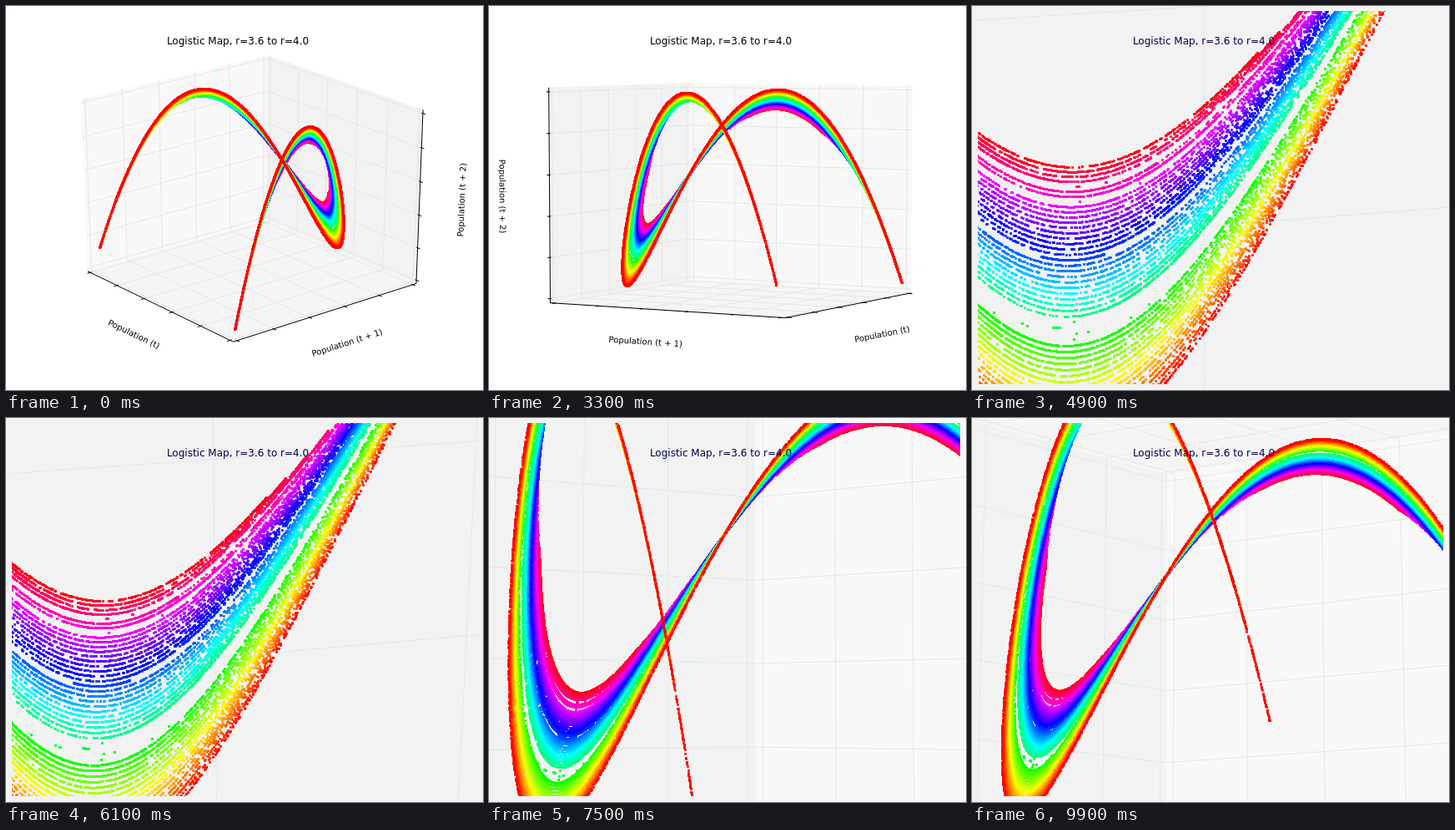
Write an HTML page with a canvas that moves like this. It is 572 by 460 pixels and loops after 10000 ms.

```html
<!DOCTYPE html>
<html lang="en">
<head>
<meta charset="utf-8">
<title>Logistic Map</title>
<style>
  html, body { margin: 0; width: 100%; height: 100%; overflow: hidden; background: #fff; }
  canvas { display: block; }
</style>
</head>
<body>
<canvas id="stage" width="572" height="460"></canvas>
<script>
const ctx = document.getElementById('stage').getContext('2d');
const W = 572, H = 460;
const STEP_MS = 100, STEPS = 100;
const PLOT = { x: 7.2, y: 6.4, w: 558, h: 446.4 };
const VIEW = { min: -0.095, span: 0.185 };
const LOW = -1 / 48, HIGH = 1 + 1 / 48;
const TICKS = [0, 0.2, 0.4, 0.6, 0.8, 1];
const LABEL_GAP = 0.135;
const DOT = 2.7;

const AXES = [
  { i: 0, tickDir: 1, flip: 1, label: 'Population (t)',     pane: '#f8f8f8', baseline: 2.7 },
  { i: 1, tickDir: 0, flip: 0, label: 'Population (t + 1)', pane: '#f2f2f2', baseline: 2.7 },
  { i: 2, tickDir: 0, flip: 0, label: 'Population (t + 2)', pane: '#f5f5f5', baseline: 1.2 }
];

// Change per step while the step number lies in [from, to].
const MOVES = [
  { from: 0,  to: 18, azim: -0.2, elev: 0,   dist: 0 },
  { from: 19, to: 29, azim: -10,  elev: -2,  dist: -0.05 },
  { from: 33, to: 49, azim: 3,    elev: 1.4, dist: -0.55 },
  { from: 61, to: 79, azim: -2,   elev: -2,  dist: 0.2 },
  { from: 80, to: 99, azim: -0.2, elev: 0,   dist: 0 }
];

function simulate(rate, discard = 20, count = 2000) {
  const pops = [];
  let pop = 0.5;
  for (let g = 0; g < discard + count; g++) {
    if (g >= discard) pops.push(pop);
    pop = pop * rate * (1 - pop);
  }
  return pops;
}

const RATES = 50;
const rateStep = (3.6 + (4 - 3.6) / RATES) - 3.6;
const orbits = Array.from({ length: RATES }, (_, i) => ({
  color: `hsl(${354.4 * (1 - i / (RATES - 1))}, 100%, 50%)`,
  pops: simulate(3.6 + i * rateStep)
}));

function cameraAt(step) {
  const cam = { azim: 321, elev: 25, dist: 11 };
  for (const m of MOVES) {
    const n = Math.max(0, Math.min(step, m.to) - m.from + 1);
    for (const key in cam) cam[key] += n * m[key];
  }
  return cam;
}

function makeView({ azim, elev, dist }) {
  const a = azim * Math.PI / 180, e = elev * Math.PI / 180;
  const ca = Math.cos(a), sa = Math.sin(a), ce = Math.cos(e), se = Math.sin(e);
  const project = (px, py, pz) => {
    const x = px - 0.5, y = py - 0.5, z = pz - 0.5;
    const depth = dist - (ca * ce * x + sa * ce * y + se * z);
    const u = (ca * y - sa * x) / depth;
    const v = (ce * z - se * (ca * x + sa * y)) / depth;
    return [
      PLOT.x + (u - VIEW.min) / VIEW.span * PLOT.w,
      PLOT.y + PLOT.h - (v - VIEW.min) / VIEW.span * PLOT.h
    ];
  };
  // Planes of the box that face away from the viewer.
  const far = [ca * ce, sa * ce, se].map(c => (c > 0 ? LOW : HIGH));
  return { project, far };
}

const replaced = (point, i, value) => point.map((c, k) => (k === i ? value : c));
const opposite = c => (c === LOW ? HIGH : LOW);

function trace(project, points) {
  ctx.beginPath();
  for (const p of points) ctx.lineTo(...project(...p));
}

function drawPane({ project, far }, { i, pane }) {
  const [j, k] = [0, 1, 2].filter(n => n !== i);
  const corner = (a, b) => replaced(replaced(far, j, a), k, b);
  trace(project, [corner(LOW, LOW), corner(HIGH, LOW), corner(HIGH, HIGH), corner(LOW, HIGH)]);
  ctx.fillStyle = pane;
  ctx.fill();
}

function drawGrid({ project, far }, { i }) {
  const [j, k] = [0, 1, 2].filter(n => n !== i);
  ctx.strokeStyle = '#e6e6e6';
  for (const t of TICKS) {
    const mid = replaced(far, i, t);
    trace(project, [replaced(mid, j, opposite(far[j])), mid, replaced(mid, k, opposite(far[k]))]);
    ctx.stroke();
  }
}

function drawAxis({ project, far }, { i, tickDir, flip, label, baseline }) {
  const start = replaced(far, flip, opposite(far[flip]));
  const end = replaced(start, i, opposite(start[i]));
  ctx.strokeStyle = '#000';
  trace(project, [start, end]);
  ctx.stroke();

  const sign = far[tickDir] === HIGH ? 1 : -1;
  for (const t of TICKS) {
    const at = offset => replaced(replaced(start, i, t), tickDir, start[tickDir] + sign * offset / 12);
    trace(project, [at(0.1), at(-0.2)]);
    ctx.stroke();
  }

  const anchor = start.map((c, k) => (k === i ? 0.5 : c + Math.sign(c - 0.5) * LABEL_GAP));
  const [x1, y1] = project(...start), [x2, y2] = project(...end);
  let angle = (Math.atan2(y1 - y2, x2 - x1) + Math.PI) % Math.PI;
  if (angle > Math.PI / 2) angle -= Math.PI;
  ctx.save();
  ctx.translate(...project(...anchor));
  ctx.rotate(-angle);
  ctx.font = '10px "DejaVu Sans", sans-serif';
  ctx.fillStyle = '#000';
  ctx.fillText(label, 0, baseline);
  ctx.restore();
}

// Dots sit on whole pixels, which keeps the bands crisp.
function drawOrbits({ project }) {
  const inset = (1 - DOT) / 2;
  ctx.save();
  ctx.beginPath();
  ctx.rect(7, 6, 558, 447);
  ctx.clip();
  for (const { color, pops } of orbits) {
    ctx.fillStyle = color;
    for (let t = 0; t + 2 < pops.length; t++) {
      const [x, y] = project(pops[t], pops[t + 1], pops[t + 2]);
      if (x < 0 || x > W || y < 0 || y > H) continue;
      ctx.fillRect(Math.floor(x) + inset, Math.floor(y) + inset, DOT, DOT);
    }
  }
  ctx.restore();
}

function draw(step) {
  const view = makeView(cameraAt(step));
  ctx.fillStyle = '#fff';
  ctx.fillRect(0, 0, W, H);
  ctx.lineWidth = 1;
  ctx.textAlign = 'center';
  for (const axis of AXES) drawPane(view, axis);
  for (const axis of AXES) {
    drawGrid(view, axis);
    drawAxis(view, axis);
  }
  drawOrbits(view);
  ctx.font = '12px "DejaVu Sans", sans-serif';
  ctx.fillStyle = step < 36 ? '#000' : '#000050';
  ctx.fillText('Logistic Map, r=3.6 to r=4.0', 278, 46);
}

let shown = -1;
function tick() {
  const step = Math.floor(performance.now() / STEP_MS) % STEPS;
  if (step !== shown) draw(shown = step);
  requestAnimationFrame(tick);
}
tick();
</script>
</body>
</html>
```
